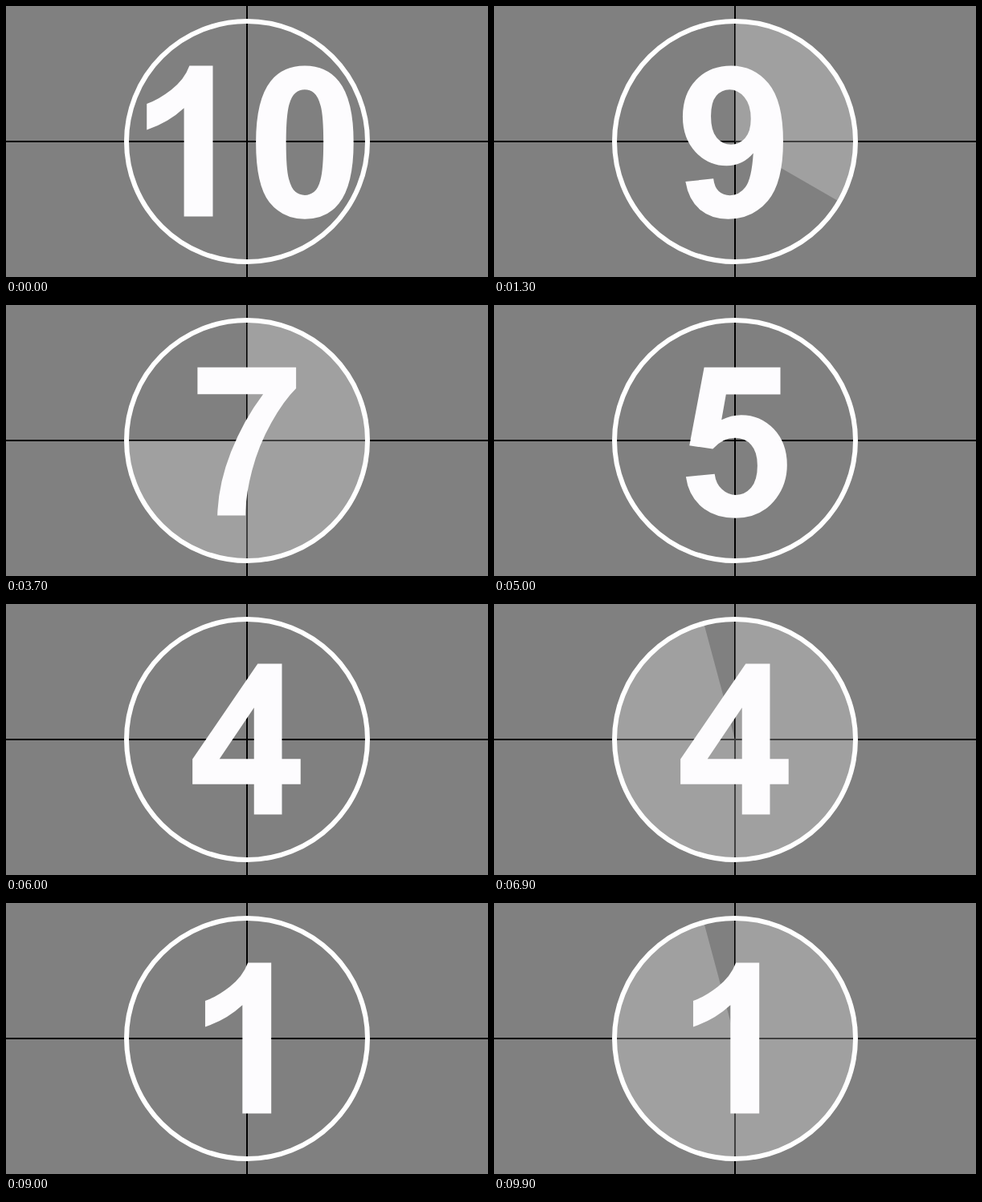
An HTML page for the animation above (10 s loop, 600 by 338 pixels).

```html
<!DOCTYPE html>
<html lang="en">
<head>
<meta charset="utf-8">
<title>Countdown</title>
<style>
html, body { margin: 0; width: 100%; height: 100%; overflow: hidden; background: #808080; }
svg { display: block; width: 100%; height: 100%; }
</style>
</head>
<body>
<svg viewBox="0 0 600 338" role="img" aria-label="Countdown from 10 to 1">
  <!-- Bold digits: 2048 units per em, y upwards, advance 1139 -->
  <defs>
    <path id="n0" d="M563 1472Q776 1472 896 1320Q1039 1140 1039 723Q1039 307 895 125Q776 -25 563 -25Q349 -25 218 139.5T87 726Q87 1140 231 1322Q350 1472 563 1472ZM563 1239Q512 1239 472 1206.5T410 1090Q381 981 381 723Q381 465 407 368.5T472.5 240 563 208Q614 208 654 240.5T716 357Q745 465 745 723Q745 981 719 1077.5T653.5 1206.5 563 1239Z"/>
    <path id="n1" d="M806 0H525V1059Q371 915 162 846V1101Q272 1137 401 1237.5T578 1472H806Z"/>
    <path id="n2" d="M1036 261V0H51Q67 148 147 280.5T463 632Q653 809 696 872Q754 959 754 1044Q754 1138 703.5 1188.5T564 1239Q476 1239 424 1186T364 1010L84 1038Q109 1270 241 1371T571 1472Q788 1472 912 1355T1036 1064Q1036 965 1000.5 875.5T888 688Q837 623 704 501T535.5 339 478 261Z"/>
    <path id="n3" d="M77 389L349 422Q362 318 419 263T557 208Q644 208 703.5 274T763 452Q763 558 706 620T567 682Q513 682 438 661L469 890Q583 887 643 939.5T703 1079Q703 1153 659 1197T542 1241Q470 1241 419 1191T357 1045L98 1089Q125 1222 179.5 1301.5T331.5 1426.5 550 1472Q757 1472 882 1340Q985 1232 985 1096Q985 903 774 788Q900 761 975.5 667T1051 440Q1051 247 910 111T559 -25Q360 -25 229 89.5T77 389Z"/>
    <path id="n4" d="M638 0V295H38V541L674 1472H910V542H1092V295H910V0ZM638 542V1043L301 542Z"/>
    <path id="n5" d="M91 377L371 406Q383 311 442 255.5T578 200Q666 200 727 271.5T788 487Q788 622 727.5 689.5T570 757Q449 757 353 650L125 683L269 1446H1012V1183H482L438 934Q532 981 630 981Q817 981 947 845T1077 492Q1077 311 972 169Q829 -25 575 -25Q372 -25 244 84T91 377Z"/>
    <path id="n6" d="M1039 1107L767 1077Q757 1161 715 1201T606 1241Q517 1241 455.5 1161T378 828Q483 952 639 952Q815 952 940.5 818T1066 472Q1066 247 934 111T595 -25Q373 -25 230 147.5T87 713Q87 1116 236 1294T623 1472Q790 1472 899.5 1378.5T1039 1107ZM402 494Q402 357 465 282.5T609 208Q687 208 739 269T791 469Q791 612 735 678.5T595 745Q514 745 458 681.5T402 494Z"/>
    <path id="n7" d="M87 1185V1446H1048V1241Q929 1124 806 905T618.5 439.5 555 0H281Q289 304 412.5 618T727 1185Z"/>
    <path id="n8" d="M328 793Q219 839 169.5 919.5T120 1096Q120 1260 234.5 1366T560 1472Q769 1472 884.5 1366T1000 1096Q1000 994 947 914.5T798 793Q920 744 983.5 650T1047 433Q1047 230 917.5 103T573 -24Q373 -24 240 81Q83 205 83 421Q83 540 142 639.5T328 793ZM386 1076Q386 992 433.5 945T560 898Q640 898 688 945.5T736 1077Q736 1156 688.5 1203.5T563 1251Q482 1251 434 1203T386 1076ZM360 450Q360 334 419.5 269T568 204Q655 204 712 266.5T769 447Q769 550 711 612.5T564 675Q461 675 410.5 604T360 450Z"/>
    <g id="n9"><use href="#n6" transform="rotate(180 563 723.5)"/></g>
    <g id="n10"><use href="#n1" x="-569.5"/><use href="#n0" x="569.5"/></g>
  </defs>
  <path d="M0 169H600M300 0V338" stroke="#000" stroke-width="2"/>
  <path id="wedge" fill="#fff" fill-opacity=".25"/>
  <circle cx="300" cy="169" r="150" fill="none" stroke="#fff" stroke-width="6"/>
  <g transform="translate(300 262.5) scale(.1277 -.1277)" fill="#fdfcfe">
    <use id="number" x="-569.5" href="#n10"/>
  </g>
</svg>
<script>
const wedge = document.getElementById('wedge');
const number = document.getElementById('number');
const CX = 300, CY = 169, R = 149;
const start = performance.now();

function sector(degrees) {
  if (!degrees) return '';
  const a = degrees * Math.PI / 180;
  const x = CX + R * Math.sin(a), y = CY - R * Math.cos(a);
  return `M${CX} ${CY}V${CY - R}A${R} ${R} 0 ${+(degrees > 180)} 1 ${x} ${y}Z`;
}

function draw(now) {
  const tick = Math.floor(Math.max(0, now - start) / 100) % 100;
  // The hand steps 15 degrees at 25 steps a second, sampled ten times a second.
  wedge.setAttribute('d', sector(15 * Math.round(2.5 * (tick % 10))));
  number.setAttribute('href', '#n' + (10 - Math.floor(tick / 10)));
  requestAnimationFrame(draw);
}
draw(start);
</script>
</body>
</html>
```
